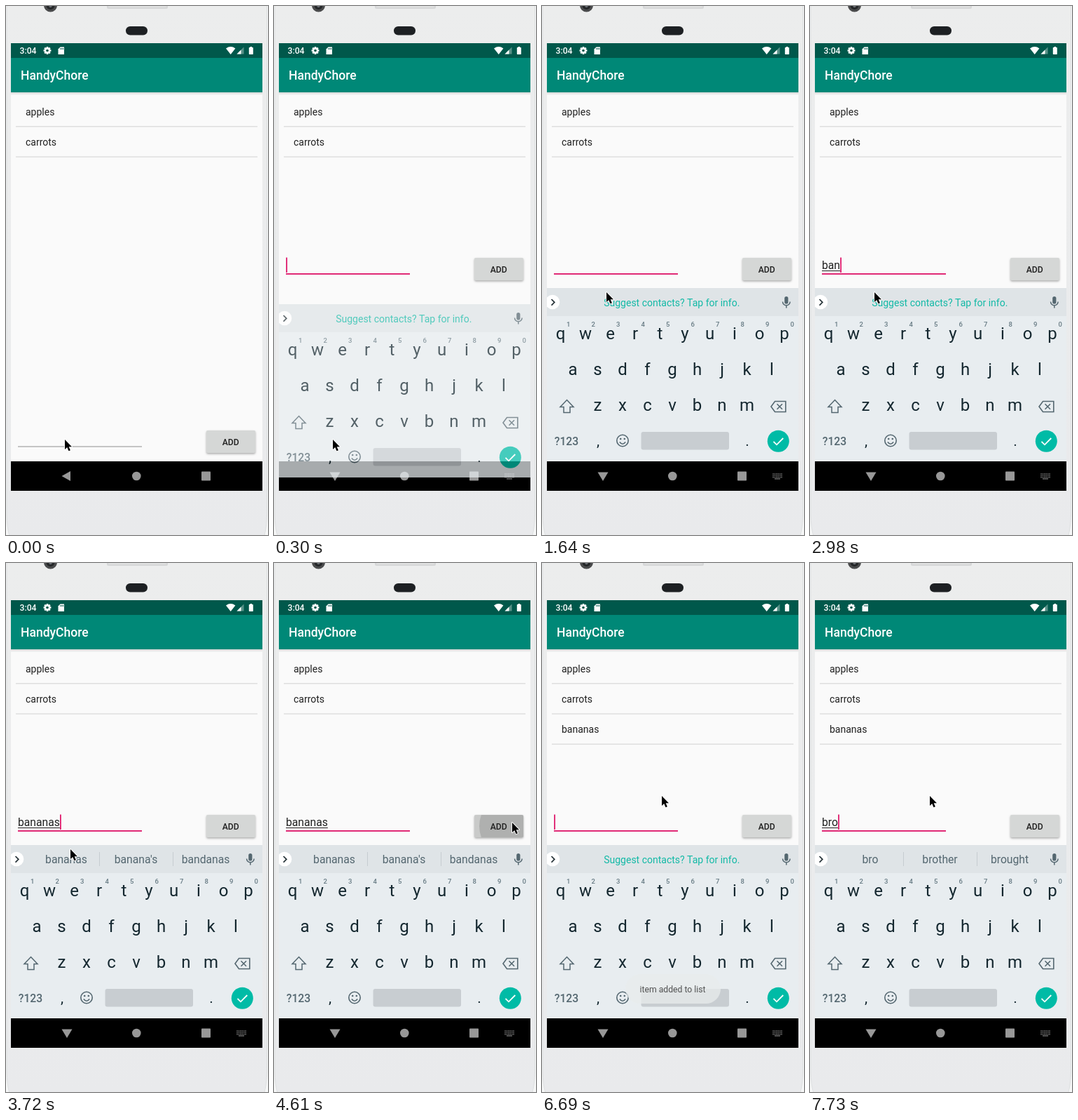
An HTML page with a canvas for the animation above (8000 ms loop, 374x754 px).

```html
<!DOCTYPE html>
<html lang="en">
<head>
<meta charset="utf-8">
<title>To-do list demo</title>
<style>
html, body { margin: 0; width: 100%; height: 100%; overflow: hidden; background: #fff; }
canvas { display: block; width: 374px; height: 754px; }
</style>
</head>
<body>
<canvas id="stage"></canvas>
<script>
const W = 374, H = 754, LOOP = 8000;
const PINK = '#dd0d63', TEAL = '#00bba6', SLATE = '#546770', INK = '#212121';
const dpr = window.devicePixelRatio || 1;

function layer(canvas) {
  canvas.width = Math.round(W * dpr);
  canvas.height = Math.round(H * dpr);
  const ctx = canvas.getContext('2d');
  ctx.scale(dpr, dpr);
  return ctx;
}
const main = layer(document.getElementById('stage'));
const keys = layer(document.createElement('canvas'));
let g = main;

// Each step changes only the listed parts of the state.
const steps = [
  [0, { mouse: [83, 617], text: '', caret: false, focus: false, keyboard: 0, words: null, items: 2, ripple: null, toast: 0 }],
  [150, { focus: true, caret: true }],
  [300, { keyboard: 0.72 }],
  [450, { keyboard: 1 }],
  [750, { caret: false, mouse: [84, 590] }],
  [900, { mouse: [88, 500] }],
  [1040, { mouse: [91, 420] }],
  [1190, { mouse: [91, 407], caret: true }],
  [1640, { caret: false }],
  [2240, { caret: true }],
  [2680, { text: 'b' }],
  [2830, { text: 'ba' }],
  [2980, { text: 'ban' }],
  [3120, { text: 'banan' }],
  [3270, { text: 'banana', words: ['banana', "banana's", 'bananas'] }],
  [3720, { text: 'bananas', words: ['bananas', "banana's", 'bandanas'] }],
  [4170, { caret: false, mouse: [240, 376] }],
  [4310, { mouse: [339, 369] }],
  [4610, { ripple: [46, 1] }],
  [4760, { ripple: [90, 1], text: '', words: null, items: 3, caret: true, toast: 0.4 }],
  [4900, { ripple: [90, 0.6], mouse: [325, 358], toast: 0.8 }],
  [5050, { ripple: [90, 0.2], mouse: [220, 300], toast: 0.95 }],
  [5210, { ripple: null, mouse: [153, 278], caret: false }],
  [5650, { mouse: [165, 312], caret: true }],
  [5800, { mouse: [170, 331] }],
  [6100, { caret: false }],
  [6690, { caret: true, toast: 0.75 }],
  [6840, { toast: 0.5 }],
  [6990, { toast: 0.2 }],
  [7140, { caret: false, toast: 0 }],
  [7580, { text: 'br', caret: true }],
  [7730, { text: 'bro', words: ['bro', 'brother', 'brought'] }]
];

function stateAt(t) {
  return Object.assign({}, ...steps.filter(s => s[0] <= t).map(s => s[1]));
}

function rect(x, y, w, h, color, r = 0) {
  g.fillStyle = color;
  g.beginPath();
  g.roundRect(x, y, w, h, r);
  g.fill();
}

function disc(x, y, r, color) {
  g.fillStyle = color;
  g.beginPath();
  g.arc(x, y, r, 0, Math.PI * 2);
  g.fill();
}

function ring(x, y, r, color, width) {
  g.strokeStyle = color;
  g.lineWidth = width;
  g.beginPath();
  g.arc(x, y, r, 0, Math.PI * 2);
  g.stroke();
}

function fillPath(d, color) {
  g.fillStyle = color;
  g.fill(new Path2D(d));
}

function strokePath(d, color, width) {
  g.strokeStyle = color;
  g.lineWidth = width;
  g.stroke(new Path2D(d));
}

function label(str, x, y, size, color, align = 'left', weight = 400) {
  g.font = `${weight} ${size}px Roboto, sans-serif`;
  g.textAlign = align;
  g.fillStyle = color;
  g.fillText(str, x, y);
}

function clipTo(x, y, w, h, r, draw) {
  g.save();
  g.beginPath();
  g.roundRect(x, y, w, h, r);
  g.clip();
  draw();
  g.restore();
}

function phone() {
  rect(0, 0, W, H, '#f6f7f7');
  const body = g.createLinearGradient(0, 0, 0, H);
  body.addColorStop(0, '#eceded');
  body.addColorStop(1, '#e9eaec');
  g.fillStyle = body;
  g.fill(new Path2D('M1 0H372.5V725Q372 743 369 754H4.5Q1.5 743 1 725Z'));
  strokePath('M1 0V725Q1.5 743 4.5 754M372.5 0V725Q372 743 369 754', '#dddfe0', 1);
  disc(63.5, -1, 9.5, '#4a4b4c');
  disc(63.5, -1, 6, '#242628');
  disc(63.5, 0, 2.2, '#666a70');
  rect(144, -4, 87, 8, '#d6d7d8', 2);
  rect(146, -4, 83, 6, '#dfe0e0', 2);
  rect(171, 29, 31, 12.5, '#1d2023', 6.2);
}

function statusBar() {
  rect(7, 53, 359, 21, '#00584b');
  label('3:04', 19.5, 68, 12.2, '#fff', 'left', 500);
  for (let i = 0; i < 4; i++) {
    g.save();
    g.translate(59, 63.5);
    g.rotate(i * Math.PI / 4);
    rect(-1.3, -5.4, 2.6, 10.8, '#fff');
    g.restore();
  }
  ring(59, 63.5, 3, '#fff', 2.4);
  disc(59, 63.5, 1.8, '#00584b');
  fillPath('M77.5 58.5H83V69H74.5V61.5Z', '#fff');
  for (const x of [77.3, 79.2, 81.1]) rect(x, 60, 1, 2, '#00584b');
  fillPath('M320.7 69L314 60.4Q320.7 55.8 327.4 60.4Z', '#fff');
  fillPath('M339.5 58.5V68.5H329.5Z', 'rgba(255,255,255,.35)');
  fillPath('M335.5 62.5V68.5H329.5Z', '#fff');
  rect(348.5, 58, 2.6, 2, '#fff');
  rect(346.8, 59, 6, 10, '#fff', 0.8);
}

function toolbar() {
  for (let i = 0; i < 4; i++) rect(7, 123 + i, 359, 1, `rgba(0,0,0,${0.13 - i * 0.035})`);
  rect(7, 74, 359, 49, '#008877');
  label('HandyChore', 21, 105, 17.5, '#fff', 'left', 500);
}

function list(count) {
  ['apples', 'carrots', 'bananas'].slice(0, count).forEach((item, i) => {
    label(item, 28, 156 + 43 * i, 14, INK);
    rect(14, 171 + 43.2 * i, 345, 1.6, '#dfdfdf');
  });
}

function entry(s, dy) {
  if (s.focus) rect(17, 381 + dy, 177, 1.8, PINK);
  else rect(17, 381.5 + dy, 177, 1, '#8f8f8f');
  label(s.text, 17, 375 + dy, 15.7, INK);
  const width = g.measureText(s.text).width;
  if (s.text) rect(17, 377 + dy, width, 1, INK);
  if (s.caret) rect(17.2 + width, 358.5 + dy, 1.7, 21.5, PINK);
}

function addButton(ripple, dy) {
  const y = 359 + dy;
  g.save();
  g.shadowColor = 'rgba(0,0,0,.32)';
  g.shadowBlur = 3 * dpr;
  g.shadowOffsetY = 1.4 * dpr;
  rect(286, y, 70, 32, '#d5d7d6', 1.8);
  g.restore();
  if (ripple) {
    const [radius, fade] = ripple;
    clipTo(286, y, 70, 32, 1.8, () => {
      rect(286, y, 70, 32, `rgba(0,0,0,${0.06 * fade})`);
      disc(339, 375 + dy, radius, `rgba(0,0,0,${0.13 * fade})`);
    });
  }
  label('ADD', 320.7, 380 + dy, 12.2, INK, 'center', 500);
}

function navBar(typing) {
  rect(7, 649, 359, 42, '#000');
  const grey = '#989898';
  fillPath(typing ? 'M79.5 664.5H94.5L87 677Z' : 'M79.5 670L92 663V677Z', grey);
  disc(186.3, 670, 6.3, grey);
  rect(279, 663.5, 13, 13, grey, 0.8);
  if (!typing) return;
  for (let row = 0; row < 3; row++)
    for (let col = 0; col < 6; col++) rect(329.3 + col * 2.4, 666.3 + row * 2.4, 1.5, 1.5, '#777');
  rect(332, 673.3, 8, 1.3, '#777');
}

function suggestions(words) {
  rect(7, 402, 359, 40, '#dfe4e7');
  clipTo(7, 402, 359, 40, 0, () => disc(15, 422, 10.3, '#fff'));
  strokePath('M13.5 418L17.8 422.3L13.5 426.6', '#263238', 1.7);
  if (words) {
    words.forEach((word, i) => label(word, 86 + 99.5 * i, 428, 15.7, SLATE, 'center'));
    for (const x of [133, 238]) rect(x, 412, 1, 20, '#c6ccd0');
  } else {
    label('Suggest contacts? Tap for info.', 185.3, 427.5, 14, '#12b9a6', 'center');
  }
  rect(346.2, 414, 5.2, 10.5, SLATE, 2.6);
  strokePath('M343.5 421.5A5.3 5.3 0 0 0 354.1 421.5M348.8 426.8V430.5', SLATE, 1.5);
}

function keyboard(words) {
  rect(7, 402, 359, 247, '#e8edf0');
  suggestions(words);
  const pitch = 35.5;
  [['qwertyuiop', 26.5, 475], ['asdfghjkl', 44, 526], ['zxcvbnm', 79.5, 577]].forEach(([row, x, y]) => {
    [...row].forEach((key, i) => label(key, x + pitch * i, y, 24, '#14272f', 'center'));
  });
  [...'1234567890'].forEach((n, i) => label(n, 37.7 + pitch * i, 457, 9.5, '#667a83', 'center', 500));
  strokePath('M35.5 561.5L45 571.5H40V579.5H31V571.5H26Z', SLATE, 1.5);
  strokePath('M332.5 563.5H347.8V578.5H332.5L327 571ZM335.5 567.3L343 574.8M343 567.3L335.5 574.8', SLATE, 1.6);
  label('?123', 35, 626, 15.7, SLATE, 'center', 500);
  label(',', 80, 627, 21, '#14272f', 'center');
  label('.', 293, 627, 21, '#14272f', 'center');
  ring(115, 619.5, 8.2, SLATE, 1.6);
  disc(112.2, 617, 1.3, SLATE);
  disc(117.8, 617, 1.3, SLATE);
  strokePath('M110.8 621.5Q115 627 119.2 621.5', SLATE, 1.5);
  rect(141.5, 607, 125.5, 25.5, '#c8cdd1', 3);
  disc(337.3, 620.3, 15.5, TEAL);
  strokePath('M330.5 620.8L335 625.3L344.3 616', '#fff', 1.8);
}

function toast(alpha) {
  g.save();
  g.globalAlpha = alpha;
  rect(119, 586, 136, 42, '#e9eced', 21);
  label('item added to list', 186.5, 611.5, 12.2, INK, 'center');
  g.restore();
}

function pointer([x, y]) {
  g.save();
  g.translate(x, y);
  g.lineJoin = 'round';
  const arrow = 'M1 1V15L4.2 12L6.5 17.2L8.9 16.2L6.7 11.2H11Z';
  strokePath(arrow, '#fff', 1.8);
  fillPath(arrow, '#000');
  g.restore();
}

function draw(s) {
  const typing = s.keyboard > 0;
  const dy = typing ? 0 : 246;
  phone();
  rect(7, 53, 359, 638, '#fafafa');
  statusBar();
  toolbar();
  list(s.items);
  entry(s, dy);
  addButton(s.ripple, dy);
  navBar(typing);
  if (typing) {
    g = keys;
    g.clearRect(0, 0, W, H);
    keyboard(s.words);
    g = main;
    g.globalAlpha = s.keyboard;
    g.drawImage(keys.canvas, 0, s.keyboard < 1 ? 23 : 0, W, H);
    g.globalAlpha = 1;
  }
  if (s.toast) toast(s.toast);
  pointer(s.mouse);
}

const start = performance.now();
function tick() {
  draw(stateAt((performance.now() - start) % LOOP));
  requestAnimationFrame(tick);
}
tick();
</script>
</body>
</html>
```
